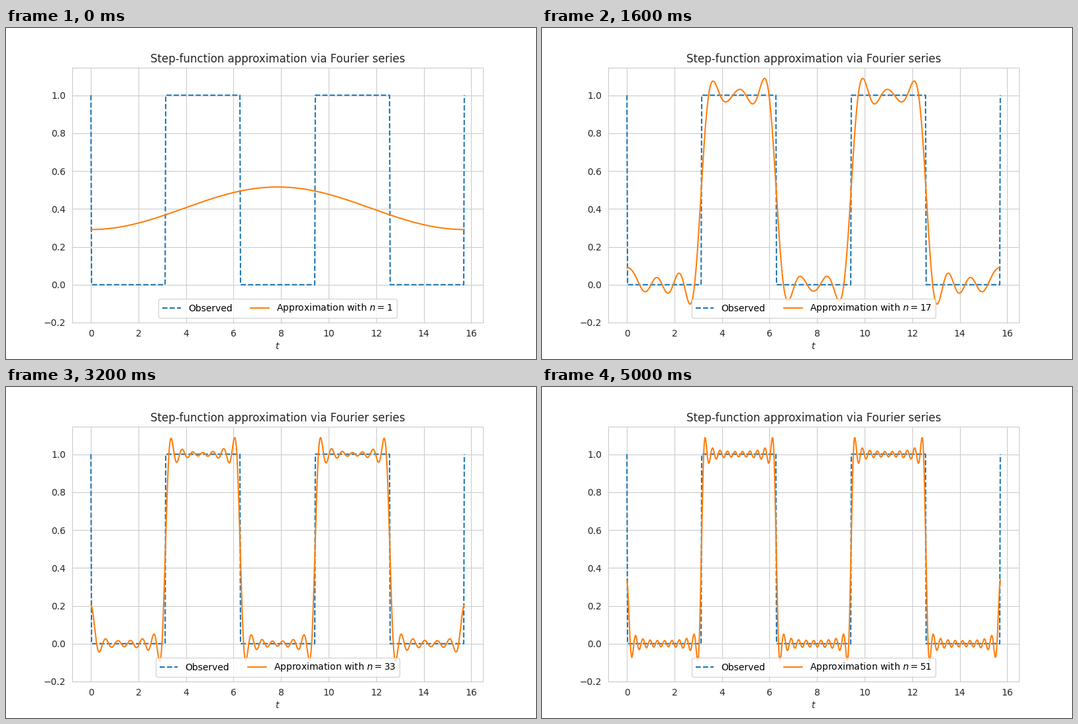
Animation of 800x500 px, one loop 5200 ms. Source, as a matplotlib script:

```python
import numpy as np
import matplotlib.pyplot as plt
from matplotlib.animation import FuncAnimation

FRAMES = 26
INTERVAL = 200
SAMPLES = 600
DARK, LIGHT = "0.15", "0.8"

plt.rcParams["font.family"] = "DejaVu Sans"

t = np.linspace(0, 5 * np.pi, SAMPLES)
step = (np.floor(t / np.pi) % 2).astype(float)
step[[0, -1]] = 1
spectrum = np.fft.fft(step)


def approximate(n):
    """Rebuild the step signal from its n lowest frequencies."""
    kept = spectrum.copy()
    kept[n:-n] = 0
    return np.fft.ifft(kept).real


fig, ax = plt.subplots(figsize=(8, 5), dpi=100)
ax.set_axisbelow(True)
ax.grid(True, color=LIGHT, linewidth=0.8)
ax.tick_params(length=0, pad=7, labelcolor=DARK)
for spine in ax.spines.values():
    spine.set_color(LIGHT)

ax.plot(t, step, "--", color="#1f77b4", label="Observed")
curve, = ax.plot(t, approximate(1), color="#ff7f0e", solid_capstyle="round")
ax.set_ylim(-0.2, 1.145)
ax.set_xlabel("$t$", color=DARK)
ax.set_title("Step-function approximation via Fourier series", color=DARK)


def update(i):
    n = 2 * i + 1
    curve.set_ydata(approximate(n))
    curve.set_label(f"Approximation with $n = {n}$")
    ax.legend(loc="lower center", ncol=2)
    return ()


anim = FuncAnimation(fig, update, frames=FRAMES, init_func=lambda: (),
                     interval=INTERVAL, repeat=True, repeat_delay=0)
plt.show()
```
